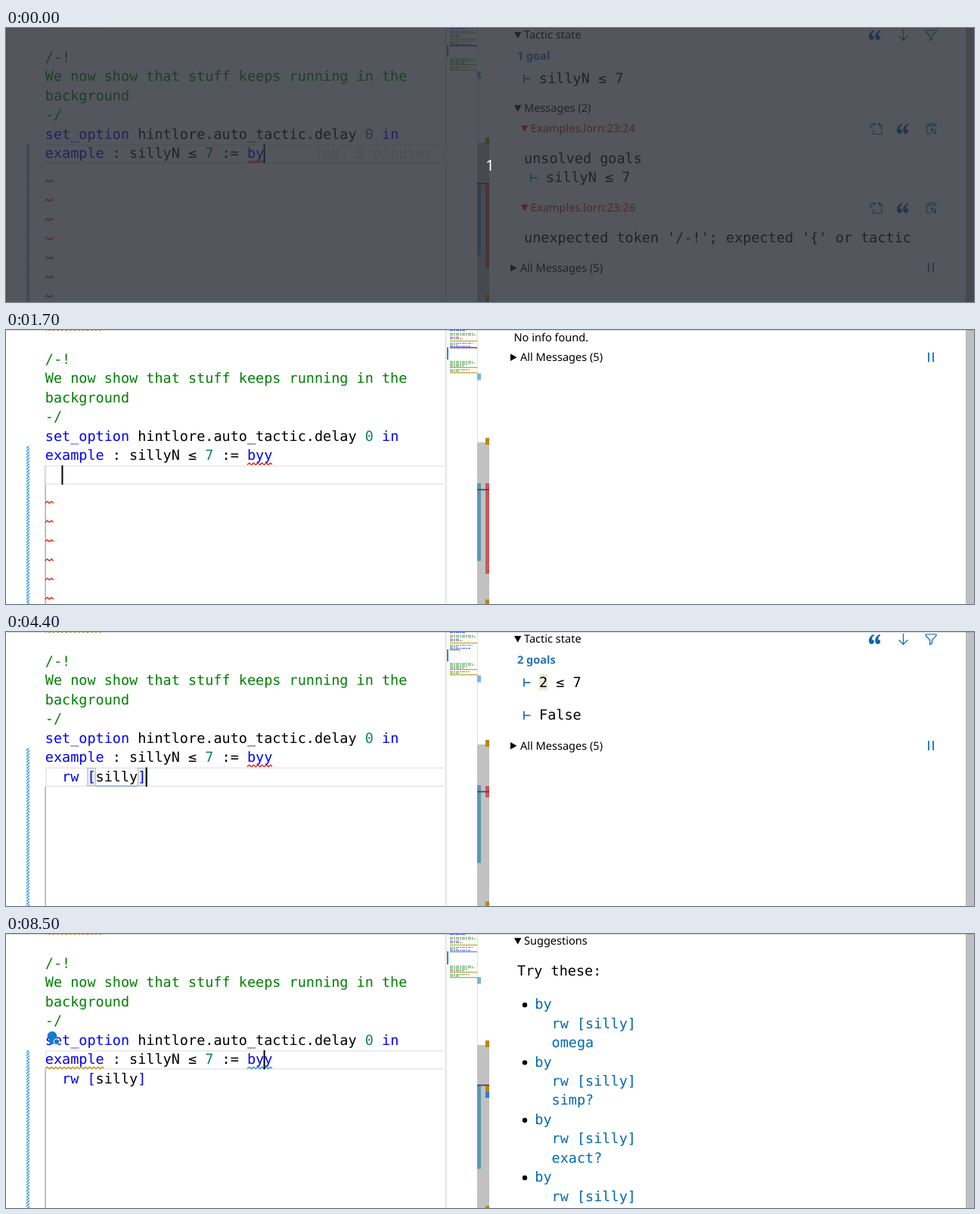
An HTML page with a canvas for the animation above (8.9 s loop, 1280x363 px).

```html
<!DOCTYPE html>
<html lang="en">
<head>
<meta charset="utf-8">
<title>Editor session</title>
<style>
html, body { margin: 0; width: 100%; height: 100%; overflow: hidden; background: #fff; }
canvas { display: block; }
</style>
</head>
<body>
<canvas id="stage" width="1280" height="363"></canvas>
<script>
const ctx = document.getElementById('stage').getContext('2d');
const LOOP = 8900, LEFT = 51.8, CELL = 11.13, LINE = 25.45;
const MONO = '18.49px "DejaVu Sans Mono", monospace';
const SANS = '14.55px "Noto Sans", sans-serif';
const BLUE = '#0000ff', GREEN = '#008000', NUM = '#098658', LINK = '#006ab1', GOAL = '#2a75b5';
const RED = '#e51400', GOLD = '#bf8803', INFO = '#1a85ff';

const rowTop = row => 26.7 + LINE * row;
const colX = col => LEFT + CELL * col;

function text(str, x, y, color = '#000', font = MONO) {
  ctx.font = font;
  ctx.fillStyle = color;
  ctx.fillText(str, x, y);
}

function rect(x1, y1, x2, y2, color) {
  ctx.fillStyle = color;
  ctx.fillRect(x1, y1, x2 - x1, y2 - y1);
}

function code(row, col, str, color) {
  text(str, colX(col), rowTop(row) + 18.3, color);
}

function squiggle(row, col, cells, color) {
  const x0 = colX(col), y = rowTop(row) + 23.4, end = cells * CELL;
  ctx.beginPath();
  for (let x = 0; x <= end; x += 0.5) ctx.lineTo(x0 + x, y + 1.1 * Math.cos(x * Math.PI / 2.8));
  ctx.strokeStyle = color;
  ctx.lineWidth = 1.3;
  ctx.stroke();
}

// ---------- timeline ----------
const KEYS = [[1900, 'r'], [2200, 'rw'], [2500, 'rw '], [3100, 'rw []'], [3300, 'rw [s]'],
  [3400, 'rw [si]'], [3500, 'rw [sil]'], [3600, 'rw [sill]'], [3800, 'rw [silly]']];

function stateAt(t) {
  const typed = KEYS.filter(k => k[0] <= t).pop();
  const tactic = typed ? typed[1] : '';
  const word = t < 300 ? 'by' : 'byy';
  const closing = t >= 3100 && t < 4100 ? 1 : 0;
  let row = 6, col = 2 + tactic.length - closing, on = true;
  if (t < 1000) { row = 5; col = 24 + word.length; }
  else if (t >= 7400) { row = 5; col = 26; on = t < 7900 || t >= 8400; }
  else if (t >= 4800) { row = 7; col = 2; on = t < 5400 || Math.floor((t - 5400) / 500) % 2 === 1; }
  return { t, tactic, word, row, col, on, lines: t < 1000 ? 0 : t < 4800 ? 1 : 2, solved: t >= 5000 };
}

// ---------- editor ----------
function hatch() {
  ctx.save();
  ctx.beginPath();
  ctx.rect(27, 154, 4, 209);
  ctx.clip();
  ctx.strokeStyle = '#2090d3';
  ctx.lineWidth = 1.4;
  ctx.beginPath();
  for (let y = 150; y < 372; y += 4) { ctx.moveTo(26, y); ctx.lineTo(32, y - 6); }
  ctx.stroke();
  ctx.restore();
}

function bracketBox(col) {
  const x = colX(col), y = rowTop(6);
  rect(x, y + 1, x + CELL, y + 24, 'rgba(0,100,0,.1)');
  ctx.strokeStyle = '#b9b9b9';
  ctx.lineWidth = 1;
  ctx.strokeRect(x + 0.3, y + 1, CELL - 0.6, 23.4);
}

function editor(s) {
  ctx.save();
  ctx.beginPath();
  ctx.rect(0, 0, 582, 363);
  ctx.clip();
  squiggle(-2, 0, 7, GOLD);
  hatch();

  const open = s.tactic.indexOf('[');
  if (s.lines) rect(51.5, rowTop(open > 0 && s.row === 6 ? 7 : 6), 52.7, 363, '#979797');
  ctx.strokeStyle = '#e8e8e8';
  ctx.lineWidth = 1.6;
  ctx.strokeRect(LEFT + 1, rowTop(s.row) + 0.8, 540, LINE - 1.4);

  code(0, 0, '/-!', GREEN);
  code(1, 0, 'We now show that stuff keeps running in the', GREEN);
  code(2, 0, 'background', GREEN);
  code(3, 0, '-/', GREEN);
  code(4, 0, 'set_option', BLUE);
  code(4, 11, 'hintlore.auto_tactic.delay');
  code(4, 38, '0', NUM);
  code(4, 40, 'in', BLUE);
  code(5, 0, 'example', BLUE);
  code(5, 8, ': sillyN ≤');
  code(5, 19, '7', NUM);
  code(5, 21, ':=');
  code(5, 24, s.word, BLUE);
  if (!s.lines) code(5, 30 + s.word.length, 'You, 5 minutes ago', '#d6d6d6');

  if (open > 0) {
    const name = s.tactic.slice(open + 1, -1);
    if (s.t < 4800) {
      bracketBox(5);
      bracketBox(6 + name.length);
      rect(colX(6), 203.6, colX(6 + name.length), 204.6, '#5c86d6');
    }
    code(6, 5, '[', BLUE);
    code(6, 6, name);
    code(6, 6 + name.length, ']', BLUE);
  }
  code(6, 2, s.tactic.slice(0, 2), BLUE);

  squiggle(5, 24, s.word.length, s.solved ? INFO : RED);
  if (s.solved) squiggle(5, 0, 7, GOLD);
  if (s.t >= 2700 && s.t < 3100) squiggle(6, 4, 1, RED);
  if (s.t < 3100) for (let row = 6 + s.lines; row < 13; row++) squiggle(row, 0, 1, RED);

  if (s.on) {
    const x = colX(s.col) - 0.6;
    rect(x, rowTop(s.row), x + 2, rowTop(s.row) + LINE, '#000');
  }
  if (s.t >= 7600) bulb();
  ctx.restore();
}

function disc(x, y, r, color) {
  ctx.beginPath();
  ctx.arc(x, y, r, 0, 7);
  ctx.fillStyle = color;
  ctx.fill();
}

function bulb() {
  disc(61, 135.2, 6.2, '#147bca');
  rect(57.5, 139, 63.5, 146, '#147bca');
  disc(67, 142.8, 4.3, '#fff');
  disc(67, 142.8, 3.2, '#147bca');
}

// ---------- minimap and overview ruler ----------
const MAP = [[0, 20, BLUE], [4, 31, GREEN], [6, 34, GREEN], [9, 12, BLUE], [11, 17, '#333'], [14, 36, GOLD],
  [17, 30, GREEN], [19, 10, GREEN], [21, 27, BLUE], [40, 30, GREEN], [42, 33, GREEN], [44, 24, GREEN],
  [46, 18, '#333'], [48, 36, GOLD], [51, 26, GREEN], [53, 13, GREEN], [55, 36, GOLD]];

function minimap(s) {
  const edge = ctx.createLinearGradient(579, 0, 584, 0);
  edge.addColorStop(0, '#fff');
  edge.addColorStop(0.6, '#e6e6e6');
  edge.addColorStop(1, '#fff');
  rect(579, 0, 584, 363, edge);

  ctx.lineWidth = 1.3;
  for (const [y, w, color] of MAP) {
    const line = color === GOLD;
    ctx.globalAlpha = line ? 0.8 : 0.6;
    ctx.setLineDash(line ? [] : [4, 1, 2, 1]);
    ctx.strokeStyle = color;
    ctx.beginPath();
    const shift = y > 30 ? s.lines : 0;
    ctx.moveTo(587, y + 0.7 + shift);
    ctx.lineTo(587 + w, y + 0.7 + shift);
    ctx.stroke();
  }
  ctx.setLineDash([]);
  ctx.globalAlpha = 1;
  if (s.solved) rect(587, 23, 623, 24.2, '#6c86a8');
  else if (s.t < 3100) rect(587, 22.7, 623, s.t >= 2700 ? 25.3 : 24.2, s.t >= 2700 ? '#e02a20' : '#a03038');
  else rect(587, 23, 600, 24.2, '#c05050');
  rect(583, 23, 585, 38 + s.lines * 1.2, '#2090d3');
}

function ruler(s) {
  const n = s.lines, gold = '#b8860b';
  rect(623, 0, 624, 363, '#dedede');
  rect(623, 58 - n / 2, 628, 67 - n / 2, '#72b8e4');
  rect(623, [152, 149, 147][n], 639, 363, '#c1c1c1');
  rect(634, [145, 143, 141][n], 639, [154, 152, 150][n], gold);
  rect(623, [207, 203, 200][n], 628, [301, 306, 311][n], '#5f97b5');
  rect(634, [353, 357, 360][n], 639, 363, gold);
  if (s.solved) {
    rect(634, 200, 639, 209, gold);
    rect(634, 209, 639, 217, '#2f7fcb');
  } else if (s.t < 3100) {
    rect(634, n ? 203 : 207, 639, n ? 323 : 318, '#c8585a');
  } else {
    rect(634, 204, 639, 219, '#c8585a');
  }
  const mark = n === 0 ? 205.3 : n === 1 ? 210.7 : s.row === 7 ? 216.3 : 199.5;
  rect(623, mark, 639, mark + 1.7, '#454545');
}

// ---------- info panel ----------
const ICONS = {
  down: new Path2D('M7 0V14M1 8.5L7 14.5L13 8.5'),
  filter: new Path2D('M.7 1H14.5V3L9 8.5V13L6.2 14.6V8.5L.7 3Z'),
  copy: new Path2D('M9.5 1H13L16 4V15H5V9.5M12.5 1V4.5H16M4 7C-.6 7-.6 2 3.4 2H7M5 0L7.2 2L5 4'),
  paste: new Path2D('M4 2.5H1V14.5H6M10 2.5H13V6M4 1.5H10V4.5H4ZM7 1.5V0M8 14V8M6 9.8L8 7.6L10 9.8M12 8V14.4M10.2 12.4L12 14.5L13.8 12.4')
};
const quote = new Path2D('M6.5 1C3 2 0 5.5 0 9.5C0 12.5 1.5 14 3.6 14C5.6 14 7 12.7 7 10.8C7 9 5.7 7.8 4 7.9C4 5.5 5 3.8 7 2.5Z');

function icon(name, x, y) {
  ctx.save();
  ctx.translate(x, y);
  ctx.strokeStyle = ctx.fillStyle = LINK;
  ctx.lineWidth = 1.2;
  if (name === 'quote') {
    ctx.fill(quote);
    ctx.translate(8.2, 0);
    ctx.fill(quote);
  } else {
    ctx.stroke(ICONS[name]);
  }
  ctx.restore();
}

function triangle(x, y, open, color) {
  ctx.beginPath();
  if (open) { ctx.moveTo(x, y - 4); ctx.lineTo(x + 9.5, y - 4); ctx.lineTo(x + 4.7, y + 4.5); }
  else { ctx.moveTo(x, y - 4.7); ctx.lineTo(x + 8.5, y); ctx.lineTo(x, y + 4.7); }
  ctx.fillStyle = color;
  ctx.fill();
}

function heading(str, x, y, color = '#000') {
  triangle(x, y, true, color);
  text(str, x + 13, y + 5, color, SANS);
}

function turnstile(x, y) {
  rect(x + 1, y - 5, x + 2.8, y + 6, GOAL);
  rect(x + 1, y - 0.4, x + 10.5, y + 1.4, GOAL);
}

function goal(str, x, y) {
  turnstile(x, y);
  text(str, x + 2 * CELL - 0.2, y + 6, '#000');
}

function message(place, y) {
  heading('Examples.lorn:' + place, 681, y, '#dd1a0c');
  icon('copy', 1142, y - 7.5);
  icon('quote', 1178, y - 7);
  icon('paste', 1216.5, y - 7.5);
}

function allMessages(count, y) {
  triangle(667, y, false, '#000');
  text(`All Messages (${count})`, 680, y + 5, '#000', SANS);
  rect(1219.2, y - 6.5, 1220.9, y + 6, LINK);
  rect(1225.2, y - 6.5, 1226.9, y + 6, LINK);
}

function tacticState(goals) {
  heading('Tactic state', 672, 9.3);
  icon('quote', 1141, 2);
  icon('down', 1179.5, 2);
  icon('filter', 1215.5, 2);
  text(goals, 676, 41.5, GOAL, 'bold ' + SANS);
}

function firstPanel() {
  tacticState('1 goal');
  goal('sillyN ≤ 7', 683, 66.5);
  heading('Messages (2)', 672, 106.3);
  message('23:24', 133);
  text('unsolved goals', 685, 178.7);
  goal('sillyN ≤ 7', 692, 198);
  message('23:26', 238);
  text("unexpected token '/-!'; expected '{' or tactic", 685, 284);
  allMessages(5, 317.7);
}

function emptyPanel() {
  text('No info found.', 671.5, 14.5, '#000', SANS);
  allMessages(5, 36.3);
}

function errorPanel() {
  tacticState('2 goals');
  goal('sillyN ≤ 7', 683, 66.5);
  goal('False', 683, 110);
  heading('Messages (1)', 672, 150.3);
  message('24:4', 177.3);
  text("unexpected token '/-!'; expected '['", 685, 222);
  allMessages(4, 257);
}

function rewrittenPanel() {
  tacticState('2 goals');
  rect(704.5, 56, 716, 77, '#e5eed2');
  goal('2 ≤ 7', 683, 66.5);
  goal('False', 683, 110);
  allMessages(5, 150.7);
}

function suggestionPanel() {
  heading('Suggestions', 672, 9.3);
  text('Try these:', 676, 55);
  ['omega', 'simp?', 'exact?', ''].forEach((last, i) => {
    const y = 99.2 + i * 3 * LINE;
    disc(686, y - 5.2, 3.2, '#000');
    text('by', 699.3, y, LINK);
    text('rw [silly]', 721.6, y + LINE, LINK);
    text(last, 721.6, y + 2 * LINE, LINK);
  });
}

function panel(t) {
  rect(639.5, 0, 1280, 363, '#fff');
  if (t < 1300) firstPanel();
  else if (t < 2900) emptyPanel();
  else if (t < 4400) errorPanel();
  else if (t < 7400) rewrittenPanel();
  else suggestionPanel();
  rect(1269, 0, 1280, 363, '#bfbfbf');
}

function countdown() {
  rect(0, 0, 1280, 363, 'rgba(40,44,52,.8)');
  ctx.textAlign = 'center';
  text('1', 640, 188.7, '#fff', '500 20px "Noto Sans", sans-serif');
  ctx.textAlign = 'left';
}

function draw(now) {
  const s = stateAt(now % LOOP);
  ctx.textRendering = 'geometricPrecision';
  rect(0, 0, 1280, 363, '#fff');
  editor(s);
  minimap(s);
  ruler(s);
  panel(s.t);
  rect(0, 0, 1280, 1, 'rgba(0,0,0,.14)');
  if (s.t < 100) countdown();
}

const start = performance.now();
function tick() {
  draw(performance.now() - start);
  requestAnimationFrame(tick);
}
tick();
</script>
</body>
</html>
```
